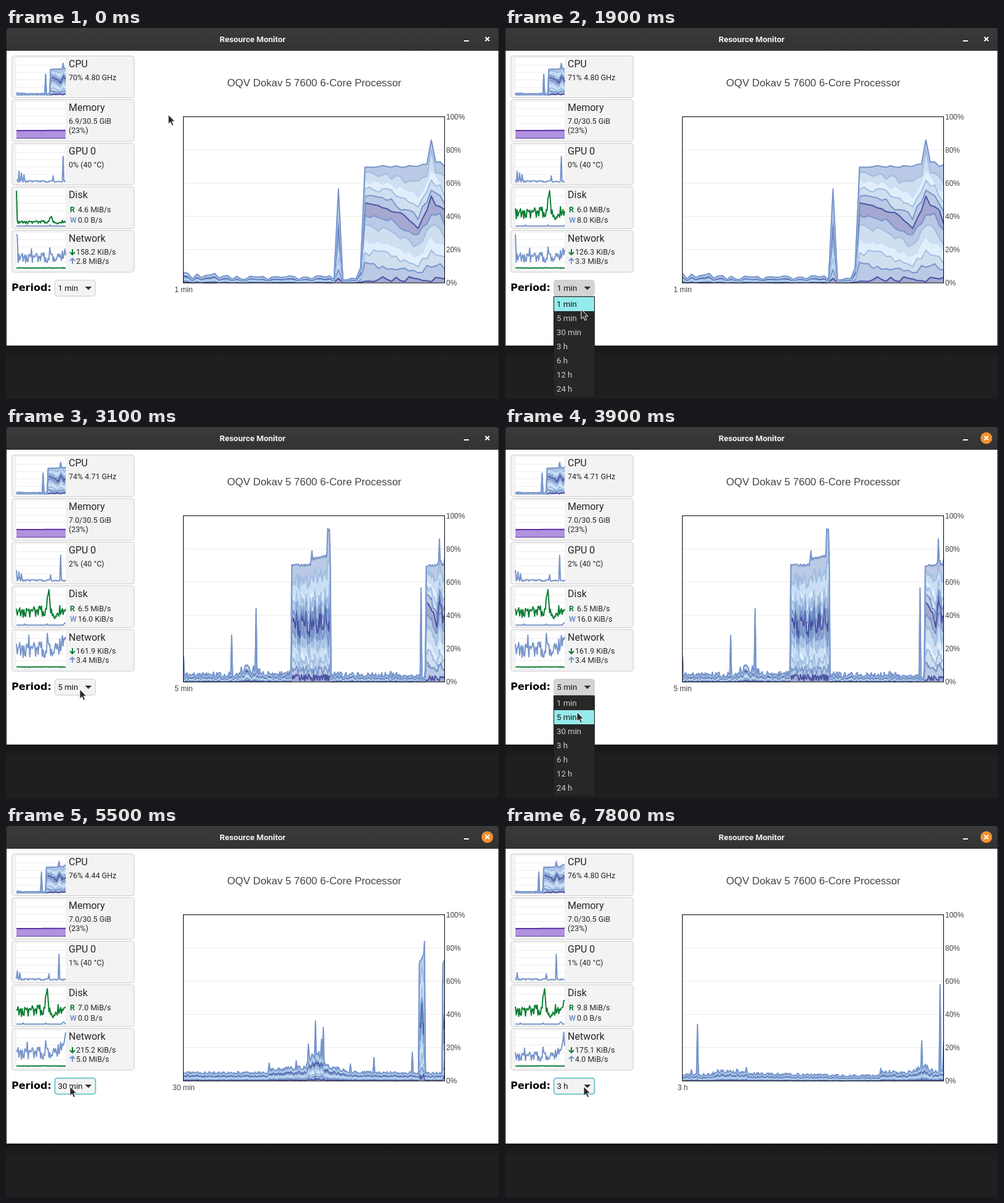
These frames come from a looping animation (802 by 604 pixels, 8000 ms). An HTML page:

```html
<!DOCTYPE html>
<html lang="en">
<head>
<meta charset="utf-8">
<title>Resource Monitor</title>
<style>
  html, body { margin: 0; width: 100%; height: 100%; overflow: hidden; background: #1f1f1f; }
  svg { display: block; }
  text { font: 12.5px Roboto, sans-serif; fill: #262626; white-space: pre; }
  .name { font-size: 16px; }
  .bold { font-weight: 700; }
  .axis { font: 12px "Liberation Sans", sans-serif; fill: #444; }
  .heading { font: 16.9px "Liberation Sans", sans-serif; fill: #444; text-anchor: middle; }
  .title { font: 700 13.4px Roboto, sans-serif; fill: #f4f4f4; text-anchor: middle; }
  .period { font: 700 16px "DejaVu Sans", sans-serif; fill: #000; }
  .option { font-size: 13.2px; }
  .line { fill: none; stroke-width: 2; stroke-linejoin: round; }
</style>
</head>
<body>
<svg width="802" height="604" viewBox="0 0 802 604">
  <defs>
    <linearGradient id="bar" x2="0" y2="1">
      <stop stop-color="#3b3b3b"/><stop offset="1" stop-color="#323232"/>
    </linearGradient>
    <linearGradient id="shade" x2="0" y2="1">
      <stop stop-color="#171717"/><stop offset="1" stop-color="#1f1f1f"/>
    </linearGradient>
    <clipPath id="plotClip"><rect x="288" y="144" width="426" height="272"/></clipPath>
  </defs>
  <rect width="802" height="604" fill="#1f1f1f"/>
  <rect y="517" width="802" height="22" fill="url(#shade)"/>
  <path d="M1 37V5Q1 0 6 0H796Q801 0 801 5V37Z" fill="url(#bar)"/>
  <rect x="1" y="36" width="800" height="1" fill="#292929"/>
  <rect x="1" y="37" width="800" height="480" fill="#fff"/>
  <text class="title" x="401" y="23">Resource Monitor</text>
  <rect x="745" y="20" width="8" height="2" fill="#fff"/>
  <circle id="hover" cx="783" cy="18" r="9.5" fill="#f39130"/>
  <path d="M779.7 14.7l6.6 6.6m0-6.6l-6.6 6.6" stroke="#fff" stroke-width="2"/>
  <text class="heading" x="501.5" y="95">OQV Dokav 5 7600 6-Core Processor</text>
  <g id="cards"></g>
  <g id="plot"></g>
  <text class="period" x="9" y="428">Period:</text>
  <g id="controls"></g>
  <path id="cursor" d="M0 0V15.5L3.5 12.2L6 18L8.6 16.8L6.2 11.1H10.8Z" fill="#2b2b2b" stroke="#fff"/>
</svg>
<script>
const LOOP = 8000;
const BLUE = '#7795cb', GREEN = '#0a7d32';
const PERIODS = ['1 min', '5 min', '30 min', '3 h', '6 h', '12 h', '24 h'];

// Each choice: button pressed, menu closed, new period shown
const CHOICES = [[1600, 2400, 2600], [3400, 5000, 5200], [5900, 6800, 7000]];
const FOCUS_FROM = 5200, HOVER_FROM = 3400;

// Pointer moves: from, to, x, y
const HOME = [264, 141];
const MOVES = [
  [400, 1000, 152, 468], [1000, 1300, 127, 425], [1700, 2000, 123, 475], [2300, 2400, 123, 467],
  [2600, 3100, 120, 427], [3650, 4100, 115, 494], [4900, 5500, 104, 424], [5800, 6400, 115, 514],
  [6800, 7400, 110, 406], [7600, 7800, 128, 424]
];

// Readouts, one entry per second
const READ = {
  cpu: [70, 71, 70, 74, 75, 76, 77, 76],
  clock: '4.80 4.80 4.81 4.71 4.60 4.44 4.80 4.80'.split(' '),
  gpu: [0, 0, 0, 2, 1, 1, 1, 1],
  disk: [4.6, 6, 5.6, 6.5, 6.8, 7, 9.7, 9.8],
  write: [0, 8, 16, 16, 8, 0, 0, 0],
  down: [158.2, 126.3, 140.2, 161.9, 190.4, 215.2, 213.8, 175.1],
  up: [2.8, 3.3, 3.1, 3.4, 4.2, 5, 6.6, 4]
};

// Swell: [sample, level]; plateaus: [from, to, start level, end level]; peaks: [sample, level].
// Live samples count seconds, 0 being the newest when the loop starts.
const LIVE = {
  jitter: 0.9,
  swell: [[-299, 4], [-231, 4], [-230, 7], [-211, 7], [-205, 4.6], [-61, 3.8], [-52, 4], [-46, 3], [-20, 2.8]],
  plateaus: [[-172, -151, 69.5, 69.5], [-150, -128, 73, 75.5], [-131, -129, 91, 91], [-18, 0, 69.5, 69.5], [-5, -1, 71, 72]],
  peaks: [[-296, 15], [-241, 28], [-213, 44], [-149, 79], [-59, 6.2], [-24, 56.5], [-19, 9], [-3, 86]]
};
const HALF_HOUR = {
  jitter: 0.35,
  swell: [[0, 4.6], [96, 4.7], [99, 6.5], [140, 8], [144, 14], [154, 16], [162, 9], [194, 5], [299, 4.2]],
  plateaus: [[270, 275, 70, 75], [297, 299, 70, 72]],
  peaks: [[98, 10.5], [129, 12], [143, 22], [151, 36], [158, 25], [160, 32], [191, 10], [218, 14], [262, 17], [276, 84]]
};
const THREE_HOURS = {
  jitter: 0.5,
  swell: [[0, 3.3], [32, 3.5], [40, 5.5], [63, 5.5], [75, 4.2], [184, 3], [223, 2.8], [229, 5], [261, 4.8], [275, 9], [289, 5]],
  peaks: [[10, 6.5], [17, 34], [73, 8], [227, 7.5], [274, 24], [295, 58], [299, 23]]
};
const GPU = { jitter: 2, swell: [[-59, 3], [-20, 2]], peaks: [[-56, 30], [-53, 25], [-50, 20], [-15, 17], [-3, 70]] };
const DISK = {
  jitter: 0.9,
  swell: [[-59, 5], [-24, 5.5], [-18, 9], [-12, 5.5], [-10, 2.4], [-4, 6.5], [0, 4.8]],
  peaks: [[-59, 58], [-17, 14.8]]
};
const NET = { jitter: 0.9, swell: [[-59, 2], [-16, 2], [0, 2.8]], peaks: [[-59, 6.2], [-58, 6], [-41, 3.6], [-19, 3.8]] };

// Darkest band of the live load
const DARK = [[-18, 49], [-13, 47], [-6, 35], [-3, 50], [-1, 48], [1, 38], [7, 44]];

const $ = id => document.getElementById(id);
const range = (count, fn) => Array.from({ length: count }, (_, i) => fn(i));
const clamp = v => Math.min(1, Math.max(0, v));
const rnd = (n, k = 0) => { const v = Math.sin(n * 12.9898 + k * 78.233 + 4) * 43758.5453; return v - Math.floor(v); };
const text = (x, y, s, cls = '', extra = '') => `<text class="${cls}" x="${x}" y="${y}" ${extra}>${s}</text>`;
const rect = (x, y, w, h, fill, extra = '') => `<rect x="${x}" y="${y}" width="${w}" height="${h}" fill="${fill}" ${extra}/>`;

function lerp(table, x) {
  const i = table.findIndex((row, j) => j && row[0] >= x);
  if (i < 0) return table.at(-1)[1];
  const [a, b] = [table[i - 1], table[i]];
  return a[1] + (b[1] - a[1]) * clamp((x - a[0]) / (b[0] - a[0]));
}

function sample({ jitter, swell, plateaus = [], peaks = [] }, x) {
  const tops = plateaus.filter(([from, to]) => x >= from && x <= to)
    .map(([from, to, a, b]) => a + (b - a) * (x - from) / (to - from) + rnd(x) * 1.4);
  const spikes = peaks.filter(([at]) => at === x).map(([, level]) => level);
  return Math.max(lerp(swell, x) * (1 + jitter * (rnd(x, 1) - 0.5)), ...tops, ...spikes);
}

const live = (profile, read, scale = 1) => n => n > 0 ? read[n] * scale : sample(profile, n);
const loadAt = live(LIVE, READ.cpu), gpuAt = live(GPU, READ.gpu, 2), diskAt = live(DISK, READ.disk), netAt = live(NET, READ.up);

// Cumulative load of the twelve threads, bottom to top
function stack(total, n) {
  const dip = (Math.abs(n) < 19 ? lerp(DARK, n) : 28 + rnd(n, 20) * 18) - 47;
  let below = 0;
  return range(12, k => {
    if (k === 11) return total;
    const mean = Math.min(2.5 + 7.3 * k, 17.2 + 4.8 * k), noise = rnd(n, k) - 0.5;
    if (total < 60) return total * (mean / 70 + noise * 0.06);
    const level = mean + Math.sin(Math.PI * k / 12) * dip + noise * 4 + (total - 70) * ((k + 1) / 12) ** 4;
    return below = Math.min(total - (11 - k) * 0.4, Math.max(below + 0.4, level));
  });
}

const liveHistory = (count, tick) => range(count, i => {
  const n = tick - count + 1 + i;
  return stack(loadAt(n), n);
});
const longHistory = profile => range(300, i => stack(sample(profile, i), i + 500));

const points = (values, box, max) => values.map((v, i) =>
  `${(box.x + box.w * i / (values.length - 1)).toFixed(1)} ${(box.y + box.h * (1 - v / max)).toFixed(1)}`).join('L');
const line = (values, box, max, color) => `<path class="line" stroke="${color}" d="M${points(values, box, max)}"/>`;
const area = (values, box, max, fill) =>
  `<path fill="${fill}" d="M${points(values, box, max)}V${box.y + box.h}H${box.x}Z"/>`;

// Dark to pale and back again, [line, fill]
const DEEP = ['#4853a2', '#a5a8d1'], MID = [BLUE, '#bac9e5'], SOFT = ['#9fbde1', '#cfdff0'], PALE = ['#c5def6', '#e1effc'];
const SHADES = [DEEP, MID, SOFT, PALE, SOFT, MID];

function stacked(history, box) {
  const bands = range(12, k => history.map(s => s[k]));
  const fills = bands.map((band, k) => area(band, box, 100, SHADES[k % 6][1])).reverse();
  const lines = bands.map((band, k) => line(band, box, 100, SHADES[k % 6][0]));
  return [...fills, ...lines].join('');
}

const PLOT = { x: 289, y: 144.5, w: 424.5, h: 270 };

function drawPlot(period, tick) {
  const history = period < 2 ? liveHistory(period ? 300 : 60, tick) : longHistory(period === 2 ? HALF_HOUR : THREE_HOURS);
  const marks = range(6, i => i * 20);
  $('plot').innerHTML =
    marks.slice(1, 5).map(p => rect(289, 414 - p * 2.7, 425, 1, '#ececec')).join('') +
    `<g clip-path="url(#plotClip)">${stacked(history, PLOT)}</g>` +
    rect(288.5, 144.5, 425, 270.5, 'none', 'stroke="#000"') +
    marks.map(p => text(716, 419 - p * 2.7, p + '%', 'axis')).join('') +
    text(289, 430, PERIODS[period], 'axis', 'text-anchor="middle"');
}

function drawCards(tick) {
  const past = fn => range(60, i => fn(tick - 59 + i));
  const box = (i, top = 49, h = 60) => ({ x: 17, y: top + 71 * i, w: 80, h });
  const disk = past(diskAt), net = past(netAt), memory = past(n => 22.2 + n * 0.012);
  const written = past(n => 0.5 + (READ.write[n] ?? (rnd(n, 8) > 0.95 ? 10 : 0)) / 5);
  const received = past(n => 1 + rnd(n, 9) * 0.6);
  const thumbs = [
    stacked(liveHistory(60, tick), box(0)),
    area(memory, box(1), 100, '#b092df') + line(memory, box(1), 100, '#5f2ea8') + rect(17, 179, 80, 1, '#55399a'),
    line(past(gpuAt), box(2), 100, BLUE),
    line(written, box(3, 50), 60, BLUE) + line(disk, box(3, 52, 56), Math.max(...disk), GREEN),
    line(net, box(4, 52, 56), Math.max(...net), BLUE) + line(received, box(4, 52, 56), 56, GREEN)
  ];
  const color = c => `style="fill:${c}"`;
  const wrote = READ.write[tick];
  const details = [
    text(102, 85, `${READ.cpu[tick]}% ${READ.clock[tick]} GHz`),
    text(102, 156, `${tick ? '7.0' : '6.9'}/30.5 GiB`) + text(102, 171, '(23%)'),
    text(102, 227, `${READ.gpu[tick]}% (40 °C)`),
    text(104, 300, 'R', 'bold', color(GREEN)) + text(117, 300, READ.disk[tick].toFixed(1) + ' MiB/s') +
    text(104, 317, 'W', 'bold', color(BLUE)) + text(117, 317, wrote.toFixed(1) + (wrote ? ' KiB/s' : ' B/s')),
    `<path class="line" stroke="${GREEN}" d="M108 360V369M104 365L108 369L112 365"/>` +
    `<path class="line" stroke="${BLUE}" d="M108 384V375M104 379L108 375L112 379"/>` +
    text(114, 369, READ.down[tick].toFixed(1) + ' KiB/s') + text(114, 384, READ.up[tick].toFixed(1) + ' MiB/s')
  ];
  $('cards').innerHTML = ['CPU', 'Memory', 'GPU 0', 'Disk', 'Network'].map((name, i) => {
    const y = 71 * i;
    return rect(9.5, 45.5 + y, 199, 68, '#f3f3f3', 'rx="4" stroke="#cdcdcd"') +
      rect(17, 49 + y, 80, 60, '#fff') +
      range(4, j => rect(17, 60 + 12 * j + y, 80, 1, '#ededed')).join('') +
      thumbs[i] + text(102, 64 + y, name, 'name') + details[i];
  }).join('');
}

function drawControls(period, open, pressed, focus, row) {
  const frame = focus ? 'stroke="#70c8cf" stroke-width="2"' : 'stroke="#cdcdcd"';
  const option = (label, i) => {
    const active = i === row, y = 438 + 23 * i;
    return (active ? rect(80, y, 65, 23, '#94ebeb') : '') +
      text(84, y + 16, label, 'option', `style="fill:${active ? '#111' : '#cfcfcf'}"`);
  };
  $('controls').innerHTML =
    rect(79.5, 410.5, 66, 26, pressed ? '#d4d4d4' : '#f3f3f3', `rx="4" ${frame}`) +
    text(84.5, 428, PERIODS[period], 'option', 'style="fill:#111"') +
    '<path d="M128.5 421H139.5L134 426.5Z" fill="#333"/>' +
    (open ? rect(79, 437, 67, 163, '#272727', 'stroke="#000" stroke-opacity=".25"') + PERIODS.map(option).join('') : '');
}

function pointerAt(t) {
  return MOVES.reduce(([x, y], [from, to, toX, toY]) => {
    const u = clamp((t - from) / (to - from));
    return [x + (toX - x) * u, y + (toY - y) * u];
  }, HOME).map(Math.round);
}

// Redraws a part only when its inputs change
const drawn = {};
function update(part, draw, ...inputs) {
  const key = inputs.join();
  if (drawn[part] === key) return;
  drawn[part] = key;
  draw(...inputs);
}

function render(time) {
  const t = Math.floor(time % LOOP / 100) * 100;
  const tick = Math.floor(t / 1000);
  const period = CHOICES.filter(c => t >= c[2]).length;
  const open = CHOICES.some(([press, close]) => t >= press && t < close);
  const pressed = CHOICES.some(([press, , shown]) => t >= press && t < shown);
  const [x, y] = pointerAt(t);
  const row = y >= 438 ? Math.floor((y - 438) / 23) : period;
  update('cards', drawCards, tick);
  update('plot', drawPlot, period, period < 2 ? tick : 0);
  update('controls', drawControls, period, open, pressed, t >= FOCUS_FROM, row);
  $('hover').setAttribute('visibility', t >= HOVER_FROM ? 'visible' : 'hidden');
  $('cursor').setAttribute('transform', `translate(${x} ${y})`);
}

const start = performance.now();
function loop() {
  render(performance.now() - start);
  requestAnimationFrame(loop);
}
loop();
</script>
</body>
</html>
```
